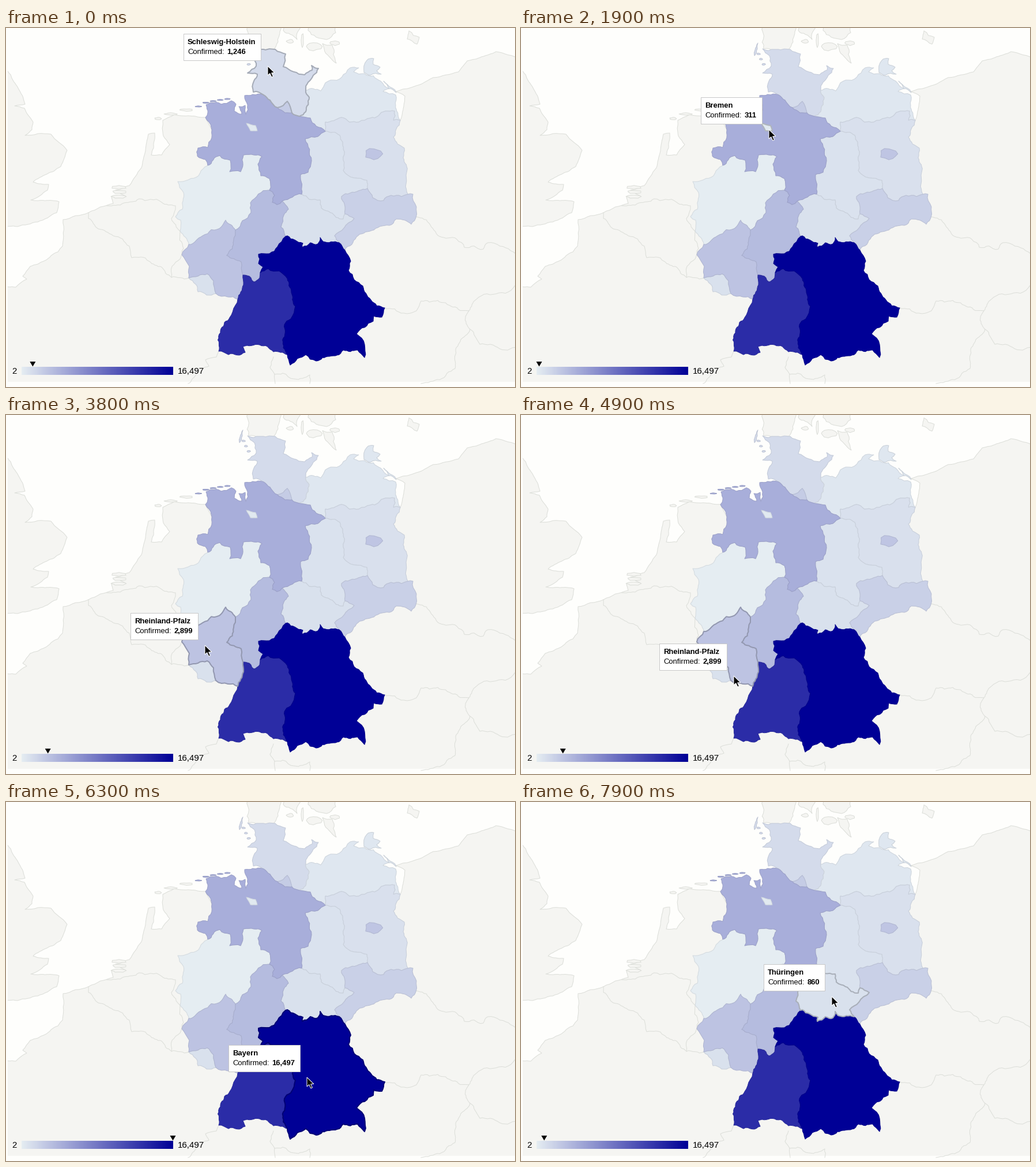
These frames come from a looping animation (883x622 px, 8000 ms). A matplotlib script:

```python
import numpy as np
import matplotlib.pyplot as plt
from matplotlib.animation import FuncAnimation
from matplotlib.patches import Polygon, Rectangle
from matplotlib.path import Path

W, H, DPI = 883, 622, 64
PX = 72 / DPI  # points per pixel
STEP, LOOP = 100, 8000
SEA, LAND, COAST = "#fefefc", "#f5f5f2", "#dcded9"
LOW, HIGH, TOP_VALUE = np.array([229, 237, 242]), np.array([0, 0, 150]), 16497
BAR_X, BAR_W = 27, 263

rng = np.random.default_rng(4)
plt.rcParams["font.family"] = "Liberation Sans"


def fractal(a, b, rough):
    """Points from a up to b, bent by repeated midpoint displacement."""
    d = b - a
    size = np.hypot(*d)
    if size < 6:
        return [a]
    mid = (a + b) / 2 + np.array([-d[1], d[0]]) * rng.uniform(-rough, rough)
    return fractal(a, mid, rough) + fractal(mid, b, rough)


def arc(*xy, rough=0.14):
    pts = np.array(xy, float).reshape(-1, 2)
    out = [p for a, b in zip(pts, pts[1:]) for p in fractal(a, b, rough)]
    return np.array(out + [pts[-1]])


def blob(x, y, rx, ry, bump=0.2, n=12):
    """Closed ragged ellipse."""
    angle = np.linspace(0, 2 * np.pi, n, endpoint=False)
    radius = 1 + rng.uniform(-bump, bump, n)
    return np.c_[x + rx * radius * np.cos(angle), y + ry * radius * np.sin(angle)]


def ring(*arcs):
    return np.vstack(arcs)


def rev(line):
    return line[::-1]


def shade(value):
    return (LOW + (HIGH - LOW) * value / TOP_VALUE) / 255


# Key points of shared borders, named after the states on each side
sh_coast = arc(447,116, 429,111, 430,92, 436,80, 419,78, 434,66, 431,48, 419,36, 440,37,
               467,37, 485,45, 481,67, 518,81, 531,73, 530,65, 542,70, 533,82, 520,108)
sh_mv = arc(520,108, 526,120, 520,145, 509,153)
sh_ns_e = arc(509,153, 496,147)
hh_n = arc(496,147, 488,127, 471,138)
hh_s = arc(496,147, 484,147, 471,138)
sh_ns_w = arc(471,138, 458,125, 447,116)
ns_mv = arc(509,153, 528,156, 538,170, 554,179)
ns_st = arc(554,179, 541,188, 519,192, 530,230, 524,250, 511,254, 513,288)
ns_th = arc(513,288, 497,293, 479,300)
ns_he = arc(479,300, 470,306, 462,302, 466,290, 457,281)
ns_nw = arc(457,281, 457,261, 442,256, 437,236, 444,223, 430,220, 412,220, 411,237, 407,249,
            388,249, 389,229, 371,221, 350,238)
ns_nl = arc(350,238, 346,228, 332,222, 333,208, 350,207, 356,172, 346,155)
ns_coast = arc(346,155, 350,147, 347,133, 355,129, 391,126, 399,132, 396,144, 409,149, 404,136,
               415,134, 416,150, 414,117, 428,115, 447,116)
mv_coast = arc(520,108, 546,109, 554,95, 590,78, 597,69, 612,69, 603,76, 622,79, 650,92,
               665,105, 654,110, 676,116, 676,134, 684,160)
mv_bb = arc(684,160, 672,160, 674,144, 658,144, 632,156, 612,163, 582,155, 554,163, 554,179)
bb_pl = arc(684,160, 677,175, 672,189, 691,208, 689,225, 695,250, 694,270, 697,288)
bb_sn = arc(697,288, 686,292, 668,290, 655,299, 636,294, 627,278)
st_bb = arc(554,179, 579,186, 585,210, 585,247, 626,264, 627,278)
st_sn = arc(627,278, 597,286, 582,292, 588,322)
th_st = arc(588,322, 585,331, 563,320, 547,312, 545,298, 526,297, 513,288)
th_sn = arc(578,372, 570,360, 586,347, 604,330, 588,322)
sn_cz = arc(697,288, 706,288, 712,310, 703,340, 692,333, 677,331, 665,342, 634,351, 608,362,
            588,385)
by_sn = arc(588,385, 578,372)
by_th = arc(578,372, 550,370, 545,363, 541,374, 528,372, 514,380, 515,373, 488,360, 485,361)
he_th = arc(485,361, 477,345, 482,324, 490,314, 479,300)
he_by = arc(485,361, 471,379, 457,391, 438,392, 438,408, 446,414, 441,424)
he_bw = arc(441,424, 440,433, 430,440, 425,433, 411,428)
he_rp = arc(411,428, 408,405, 383,394, 395,368, 398,350)
he_nw = arc(398,350, 425,320, 424,303, 457,281)
rp_nw = arc(398,350, 381,333, 374,344, 341,360, 317,375)
nw_w = arc(317,375, 302,352, 303,333, 294,327, 306,314, 308,285, 298,266, 334,256, 350,238)
rp_bw = arc(411,428, 412,445, 402,470)
rp_fr = arc(402,470, 385,466, 364,460)
sl_rp = arc(364,460, 360,438, 349,426, 317,433)
sl_fr = arc(364,460, 333,457, 329,444, 317,433)
rp_w = arc(317,433, 318,413, 305,393, 317,375)
bw_by = arc(441,424, 455,417, 474,421, 488,434, 502,482, 494,504, 483,514, 488,566)
bw_s = arc(488,566, 464,561, 440,549, 411,552, 415,562, 386,566, 369,560)
bw_fr = arc(369,560, 379,510, 402,470)
by_s = arc(588,385, 598,404, 594,420, 619,447, 657,485, 652,501, 638,499, 637,508, 608,530,
           622,548, 622,571, 610,558, 585,558, 561,569, 538,577, 520,566, 493,584, 488,566)

# name: (confirmed, outline)
states = {
    "Schleswig-Holstein": (1246, ring(sh_coast, sh_mv, sh_ns_e, hh_n, sh_ns_w)),
    "Mecklenburg-Vorpommern": (427, ring(mv_coast, mv_bb, rev(ns_mv), rev(sh_mv))),
    "Brandenburg": (881, ring(rev(mv_bb), bb_pl, bb_sn, rev(st_bb))),
    "Sachsen-Anhalt": (757, ring(st_bb, st_sn, th_st, rev(ns_st))),
    "Nordrhein-Westfalen": (2, ring(rev(he_nw), rp_nw, nw_w, rev(ns_nw))),
    "Thüringen": (860, ring(rev(ns_th), rev(th_st), rev(th_sn), by_th, he_th)),
    "Sachsen": (2033, ring(rev(bb_sn), sn_cz, by_sn, th_sn, rev(st_sn))),
    "Hamburg": (2311, ring(hh_n, rev(hh_s))),
    "Saarland": (837, ring(rev(sl_rp), sl_fr)),
    "Rheinland-Pfalz": (2899, ring(rev(rp_nw), rev(he_rp), rp_bw, rp_fr, sl_rp, rp_w)),
    "Hessen": (3445, ring(rev(he_th), he_by, he_bw, he_rp, he_nw, rev(ns_he))),
    "Niedersachsen": (4382, ring(rev(sh_ns_w), rev(hh_s), rev(sh_ns_e), ns_mv, ns_st, ns_th,
                                 ns_he, ns_nw, ns_nl, ns_coast)),
    "Baden-Württemberg": (13410, ring(rev(he_bw), bw_by, bw_s, bw_fr, rev(rp_bw))),
    "Bayern": (16497, ring(rev(by_th), rev(by_sn), by_s, rev(bw_by), rev(he_by))),
    "Berlin": (2754, blob(638, 218, 14, 10)),
    "Bremen": (311, arc(417,165, 433,169, 436,178, 424,178, 417,165, rough=0.05)),
}

# Neighbouring countries
fr_coast = arc(-9,446, 17,449, 36,435, 29,430, 42,413, 90,388, 98,378, 99,332, 143,320, rough=0.06)
nl_coast = arc(143,320, 186,304, 183,292, 207,291, 190,281, 214,273, 235,242, 247,184, 258,182,
               256,208, 252,220, 270,220, 284,202, 273,187, 272,160, 292,150, 346,155, rough=0.06)
pl_coast = arc(684,160, 690,136, 692,118, 676,110, 700,104, 785,76, 800,57, 850,41, 892,54,
               rough=0.05)
fr_be = arc(143,320, 143,330, 160,348, 186,360, 214,378, 218,398, 248,404, 287,432, 317,433)
fr_ch = arc(369,560, 365,570, 346,575, 352,586, 316,616)
france = ring(fr_coast, fr_be, rev(sl_fr), rev(rp_fr), rev(bw_fr), fr_ch, [(316, 630), (-9, 630)])
mainland = ring(fr_coast, nl_coast, [(420, 300), (600, 300)], pl_coast, [(892, 630), (-9, 630)])
britain = arc(-9,60, 21,104, 33,132, 15,135, 32,139, 47,163, 45,176, 33,186, 78,184, 106,212,
              95,240, 47,267, 74,271, 72,281, 43,298, 92,301, 88,320, 55,336, 20,344, -9,346,
              rough=0.06)
denmark = [
    arc(420,-9, 421,36, 462,46, 473,16, 481,-9),
    arc(484,-9, 481,4, 505,20, 512,-9),
    arc(520,-9, 524,4, 556,20, 572,8, 569,-9),
    arc(549,27, 566,30, 573,61, 552,36, 549,27),
    blob(533, 32, 14, 7), blob(514, 21, 2, 11), blob(493, 23, 6, 3), blob(571, 26, 8, 4),
]
bornholm = arc(699,5, 717,16, 713,28, 696,19, 699,5)
dutch_isles = [blob(x, y, r, 2) for x, y, r in ((264, 157, 6), (286, 149, 10), (313, 142, 10))]
zeeland = [blob(196, y, 12, 3) for y in (276, 284, 292)]

borders = [
    fr_be, fr_ch,
    arc(175,308, 205,303, 231,296, 270,302, 294,308, 287,330, 302,352),
    arc(302,352, 308,382, 288,413, 287,432),
    arc(464,570, 458,588, 466,600, 467,616),
    arc(466,600, 480,598, 500,608, 527,601, 527,616),
    arc(657,485, 690,494, 712,490, 720,473, 749,472, 803,490, 816,470, 855,459, 892,440),
    arc(803,490, 797,500, 805,522, 788,543, 779,590, 720,616),
    arc(805,522, 822,548, 892,553),
    arc(708,325, 752,361, 782,366, 795,380, 828,383, 836,372, 857,378, 892,397),
]

# Islands as (state, outline)
islands = [
    ("Schleswig-Holstein", arc(405,48, 406,38, 411,26, 410,36, 405,48)),
    ("Mecklenburg-Vorpommern", arc(621,77, 626,56, 638,53, 637,63, 649,68, 643,74, 651,80, 632,82,
                                   621,77)),
    ("Mecklenburg-Vorpommern", arc(655,92, 670,104, 677,112, 664,105, 655,92)),
]
islands += [("Schleswig-Holstein", blob(412 + 4.5 * k, 45 + 9 * k, 3, 1.5)) for k in range(3)]
islands += [("Niedersachsen", blob(334 + 12.5 * k, 136 - 13 * k ** 0.5 / 2, 5, 1)) for k in range(5)]

# Pointer way points (time, x, y), joined by straight moves
path = np.array([
    (300, 454, 66), (1000, 441, 161), (1300, 430, 175), (2000, 430, 176), (2600, 382, 254),
    (3800, 345, 399), (3900, 345, 399), (4000, 336, 419), (4300, 333, 440), (4400, 333, 440),
    (4900, 369, 452), (5100, 382, 480), (5300, 408, 495), (6300, 522, 477), (7100, 578, 380),
    (7300, 588, 366), (7800, 541, 337), (7900, 539, 337)])

fig = plt.figure(figsize=(W / DPI, H / DPI), dpi=DPI, facecolor=SEA)
ax = fig.add_axes([0, 0, 1, 1])
ax.axis("off")
frame = Rectangle((3, 0), 880, 613, transform=ax.transData)


def shape(pts, fill, edge, width=1.0, z=1):
    patch = Polygon(pts, fc=fill, ec=edge, lw=width * PX, zorder=z, joinstyle="round")
    ax.add_patch(patch)
    patch.set_clip_path(frame)
    return patch


def label(x, y, text, size, weight="normal"):
    return ax.text(x, y, text, size=size * PX, weight=weight, color="black", zorder=9)


for land in [mainland, britain, bornholm, *denmark, *dutch_isles, *zeeland]:
    shape(land, LAND, COAST)
for line in borders:
    ax.plot(*line.T, color=COAST, lw=PX, zorder=2, clip_path=frame)
for name, (value, outline) in states.items():
    shape(outline, shade(value), shade(value) * 0.92, z=3)
for name, outline in islands:
    color = shade(states[name][0])
    shape(outline, color, color * 0.9, z=3)

ramp = LOW + (HIGH - LOW) * np.linspace(0, 1, BAR_W)[:, None]
ax.imshow(ramp[None] / 255, extent=(BAR_X, BAR_X + BAR_W, 601, 587), aspect="auto", zorder=5)
label(10.5, 599, "2", 15)
label(298, 599, "16,497", 15)
ax.set(xlim=(0, W), ylim=(H, 0))

glow = shape(france, "none", COAST, 2, z=4)
marker = Polygon([(0, 0), (1, 0), (0, 1)], fc="black", ec="none", zorder=6)
box = Rectangle((0, 0), 10, 46, fc="white", ec="#c8c8c8", lw=PX, zorder=8)
arrow = Polygon([(0, 0), (1, 0), (0, 1)], fc="black", ec="white", lw=PX, zorder=10)
for patch in (marker, box, arrow):
    ax.add_patch(patch)
title = label(0, 0, "", 13, "bold")
caption = label(0, 0, "Confirmed:", 13)
amount = label(0, 0, "", 13, "bold")
ARROW = np.array([(0, 0), (0, 16), (3.8, 12.6), (6.8, 19), (9.4, 17.9), (6.6, 11.8), (11.8, 11.5)])
CAPTION_W = caption.get_window_extent().width + 5


def state_at(x, y):
    """Topmost state under the pointer, or None."""
    hits = (name for name in reversed(states) if Path(states[name][1]).contains_point((x, y)))
    return next(hits, None)


def show_tooltip(name, value, x, y):
    title.set_text(name)
    amount.set_text(f"{value:,}")
    inner = max(title.get_window_extent().width, CAPTION_W + amount.get_window_extent().width)
    width = round(inner) + 16
    left, top = x - 13 - width, y - 57
    box.set_bounds(left + 0.5, top + 0.5, width, 46)
    title.set_position((left + 8, top + 19))
    caption.set_position((left + 8, top + 36))
    amount.set_position((left + 8 + CAPTION_W, top + 36))


def update(i):
    x, y = (round(float(np.interp(i * STEP, path[:, 0], path[:, k]))) for k in (1, 2))
    arrow.set_xy(ARROW + (x, y))
    name = state_at(x, y)
    for artist in (marker, box, title, caption, amount):
        artist.set_visible(name is not None)
    if name is None:
        glow.set_xy(france)
        glow.set_edgecolor("#bfbfbd")
        glow.set_visible(Path(france).contains_point((x, y)))
        return
    value, outline = states[name]
    glow.set_xy(outline)
    glow.set_edgecolor(shade(value) * 0.78)
    glow.set_visible(True)
    mx = BAR_X - 0.5 + BAR_W * value / TOP_VALUE
    marker.set_xy([(mx - 5, 578), (mx + 5, 578), (mx, 586.5)])
    show_tooltip(name, value, x, y)


anim = FuncAnimation(fig, update, frames=LOOP // STEP, interval=STEP, repeat=True, repeat_delay=0)
plt.show()
```
